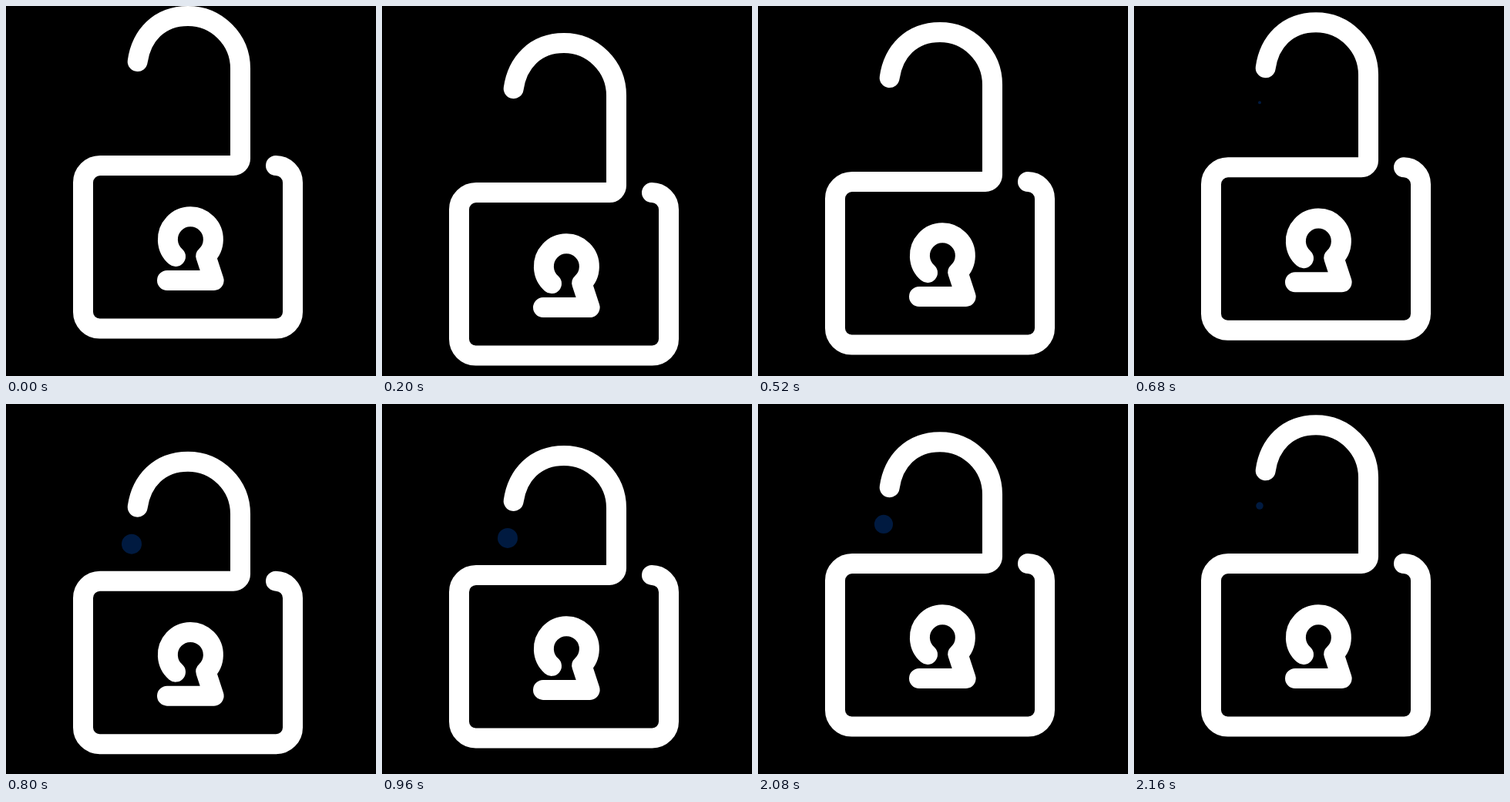
These frames come from a looping animation (480 px wide and 480 px high, 2200 ms). An HTML page:

```html
<!DOCTYPE html>
<html lang="en">
<head>
<meta charset="utf-8">
<title>Padlock</title>
<style>
  html, body { margin: 0; height: 100%; overflow: hidden; background: #000; }
  svg { display: block; width: 100%; height: 100%; }
  path { fill: none; stroke: #fff; stroke-width: 26; stroke-linecap: round; stroke-linejoin: round; }
</style>
</head>
<body>
<svg viewBox="0 0 480 480">
  <g id="lock">
    <circle id="dot" cx="163" fill="#001a40"/>
    <path id="body"/>
    <path d="M220 325A29.5 29.5 0 1 1 259.3 324.5L269.6 356H209"/>
  </g>
</svg>
<script>
const LOOP = 2200, TRAVEL = 39;
const lock = document.getElementById('lock');
const dot = document.getElementById('dot');
const body = document.getElementById('body');

const ramp = (t, from, to) => Math.min(1, Math.max(0, (t - from) / (to - from)));
const ease = x => Math.sin(x * Math.PI / 2) ** 2;

// Dip down to `depth` at `peak` and back.
const dip = (t, start, peak, end, depth) =>
  depth * (ease(ramp(t, start, peak)) - ease(ramp(t, peak, end)));

function draw(t) {
  const drop = dip(t, 0, 352, 640, 57.5) + dip(t, 640, 860, 1075, 27.2);
  const closed = ease(ramp(t, 640, 800)) - ramp(t, 2040, 2192) ** 2;
  const y = TRAVEL * closed;

  lock.setAttribute('transform', `translate(0 ${drop})`);
  // Case from the right end round to the shackle, whose bow moves by y.
  body.setAttribute('d',
    'M350 207A22 22 0 0 1 372 229V397A21.5 21.5 0 0 1 350.5 418.5' +
    'H121.5A21.5 21.5 0 0 1 100 397V229A22 22 0 0 1 122 207H295A9 9 0 0 0 304 198' +
    `V${81 + y}C304 ${43.5 + y} 273.5 ${13 + y} 236 ${13 + y}` +
    `S175.5 ${38.5 + y} 170.7 ${72 + y}`);
  dot.setAttribute('cy', 116.5 + 42.5 * closed);
  dot.setAttribute('r', 13 * closed);
}

const begin = performance.now();
function tick() {
  draw((performance.now() - begin) % LOOP);
  requestAnimationFrame(tick);
}
tick();
</script>
</body>
</html>
```
